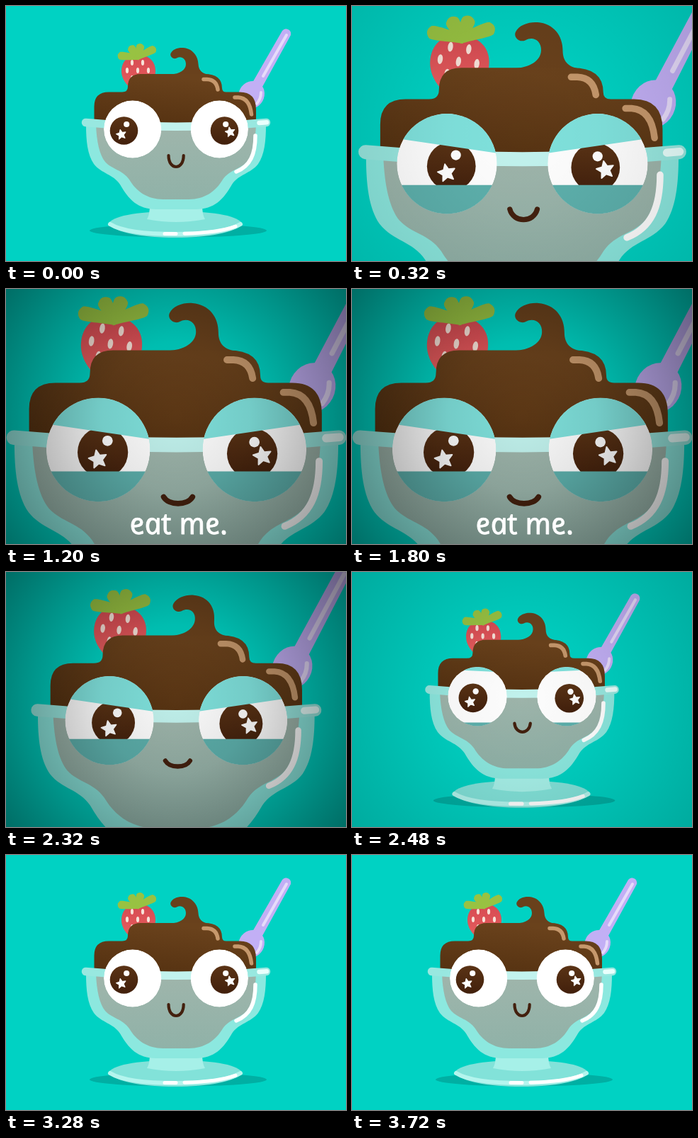
An HTML page that plays this animation: 480 px wide and 360 px high, repeating every 4320 ms.

```html
<!DOCTYPE html>
<html lang="en">
<head>
<meta charset="utf-8">
<title>Pudding cup</title>
<style>
html, body { margin: 0; width: 100%; height: 100%; overflow: hidden; background: #00d2c3; }
svg { display: block; width: 100vw; height: 100vh; }
text { font: italic 500 42px "Noto Sans", "Open Sans", sans-serif; fill: #fff; stroke: #fff; stroke-width: .8; stroke-linejoin: round; white-space: pre; }
.line { fill: none; stroke-linecap: round; stroke-linejoin: round; }
</style>
</head>
<body>
<svg viewBox="0 0 480 360" preserveAspectRatio="none">
  <defs>
    <linearGradient id="choc" x1="0" y1="1" x2=".35" y2="0">
      <stop offset="0" stop-color="#533010"/><stop offset="1" stop-color="#6a421c"/>
    </linearGradient>
    <linearGradient id="iris" x1="0" y1="0" x2="0" y2="1">
      <stop offset="0" stop-color="#5a3315"/><stop offset="1" stop-color="#42200c"/>
    </linearGradient>
    <linearGradient id="fill" x1="0" y1="0" x2="0" y2="1">
      <stop offset="0" stop-color="#9fb5ab"/><stop offset="1" stop-color="#90b2a8"/>
    </linearGradient>
    <linearGradient id="red" x1="0" y1="0" x2="0" y2="1">
      <stop offset="0" stop-color="#d64a52"/><stop offset="1" stop-color="#e8605f"/>
    </linearGradient>
    <linearGradient id="rim" gradientUnits="userSpaceOnUse" x1="107" y1="0" x2="373" y2="0">
      <stop offset=".1" stop-color="#98e8e0"/><stop offset=".4" stop-color="#c2f3ee"/>
      <stop offset=".6" stop-color="#c2f3ee"/><stop offset=".9" stop-color="#98e8e0"/>
    </linearGradient>
    <radialGradient id="dark" gradientUnits="userSpaceOnUse" cx="240" cy="180" r="300">
      <stop offset="0" stop-opacity=".02"/><stop offset=".35" stop-opacity=".1"/>
      <stop offset=".7" stop-opacity=".3"/><stop offset="1" stop-opacity=".48"/>
    </radialGradient>
    <clipPath id="ball"><circle r="40.7"/></clipPath>
  </defs>
  <rect width="480" height="360" fill="#00d2c3"/>
  <g id="cup">
    <ellipse cx="243" cy="317" rx="125" ry="9.5" fill="#00afa3"/>
    <path d="M144 308C150 297 180 290 240 290S328 297 334 308C322 320 286 327 239 327S156 320 144 308Z" fill="#82e2d9"/>
    <path class="line" d="M147 308Q170 322 239 322T331 308" stroke="#b4f5ee" stroke-width="6"/>
    <path class="line" d="M224 321.5H240M252 321.3Q300 320 324 311" stroke="#fff" stroke-width="5"/>
    <path d="M203 280H277Q277 295 281 301Q240 309 199 301Q203 295 203 280Z" fill="#a6f0e8"/>

    <g id="spoon">
      <g fill="#c2aff5">
        <path d="M390 35Q394 30 400 34Q404 38 401 43L362 114L348 108Z"/>
        <ellipse cx="346.5" cy="125.5" rx="18" ry="20" transform="rotate(29 346.5 125.5)"/>
      </g>
      <path class="line" d="M396 41L363 99M360 122Q360 131 354 138" stroke="#e6dbfa" stroke-width="4"/>
    </g>
    <g id="berry">
      <path d="M-24 -1C-24 -17 -12 -24 0 -24S24 -17 24 -1C24 14 10 26 0 28C-10 26 -24 14 -24 -1Z" fill="url(#red)"/>
      <g id="seeds" fill="#f7e2d8"></g>
      <g id="leaves" fill="#98c242"></g>
    </g>

    <path d="M113 168C113 190 115 210 124 223C135 237 151 237 161 252C173 273 186 287 212 287H268C294 287 307 273 319 252C329 237 345 237 356 223C365 210 367 190 367 168Z" fill="#8ce8df"/>
    <path d="M127 168C128 192 132 210 140 220C150 231 164 231 174 245C184 262 200 273 222 273H258C280 273 296 262 306 245C316 231 330 231 340 220C348 210 352 192 353 168Z" fill="url(#fill)"/>
    <path class="line" d="M352 183C352 209 345 226 325 234" stroke="#fff" stroke-width="5.5"/>

    <g id="pudding">
      <path id="curl" d="M232 98V96.500C246 96 254 90 254 82C254 74 247 70 241 73.500C236 76 231 71 232.500 67C235 61 243 58.500 250 59C263 60 271 70 271.500 82C272 91 277 96 288 97Z" fill="#69411c"/>
      <path d="M124.500 168V142Q124.500 121.500 145 121.500H164Q172 121.500 172 114Q172 96 190 96H280Q305 96 305 116Q305 121.500 311 121.500H330Q353 121.500 353 146V168Z" fill="url(#choc)"/>
      <path class="line" d="M279 103.500H284Q297 104 299 118M323 129H328Q344 130 346.500 153" stroke="#c6986c" stroke-width="5.500"/>
    </g>
    <path class="line" d="M112.500 164.500Q240 176 367.500 164.500" stroke="url(#rim)" stroke-width="11.500"/>
    <path class="line" d="M357.500 165L368 164.200" stroke="#e8fffc" stroke-width="6.500"/>
    <g id="eyes"></g>
    <path id="smile" class="line" stroke="#43200e" stroke-width="4.200"/>
    <path id="mouth" fill="#43200e"/>
  </g>
  <rect id="shade" width="480" height="360" fill="url(#dark)"/>
  <text id="word" transform="translate(177 346) skewX(12)"></text>
</svg>
<script>
const LOOP = 4320;
const $ = id => document.getElementById(id);
const set = (el, name, v) => el.setAttribute(name, v);

function add(parent, tag, attrs) {
  const el = document.createElementNS("http://www.w3.org/2000/svg", tag);
  for (const k in attrs) set(el, k, attrs[k]);
  parent.appendChild(el);
  return el;
}

const smooth = u => u * u * (3 - 2 * u);
const cubic = u => u < .5 ? 4 * u ** 3 : 1 - 4 * (1 - u) ** 3;
const ramp = (t, a, b, ease = smooth) => ease(Math.min(1, Math.max(0, (t - a) / (b - a))));
// Rises from a to b, falls from c to d
const hold = (t, a, b, c, d, ease) => ramp(t, a, b, ease) - ramp(t, c, d, ease);
// Damped swing that peaks near 1 after a quarter of its length
function swing(t, from, len) {
  const u = (t - from) / len;
  return u > 0 && u < 1 ? 1.8 * (1 - u) ** 2 * Math.sin(2 * Math.PI * u) : 0;
}

// Strawberry details
for (let row = 0; row < 3; row++) {
  const odd = row % 2;
  for (let k = 0; k < 2 + odd; k++)
    add($("seeds"), "ellipse", { cx: -9 - 7 * odd + 15 * k, cy: -13 + 11 * row, rx: 2.1, ry: 4 });
}
for (let i = 0; i < 4; i++) {
  const len = i % 3 ? 20 : 29;
  add($("leaves"), "path", {
    d: `M-4 2C-4 -8 -7 ${6 - len} -5 ${3 - len}Q0 ${-2 - len} 5 ${3 - len}C7 ${6 - len} 4 -8 4 2Z`,
    transform: `translate(-1 -21) rotate(${50 * i - 86})`
  });
}

// Eyes
function star(x, y) {
  let d = "";
  for (let i = 0; i < 10; i++) {
    const r = i % 2 ? 3.5 : 7.4, a = i * Math.PI / 5 - .2;
    d += (i ? "L" : "M") + (x + r * Math.sin(a)).toFixed(2) + " " + (y - r * Math.cos(a)).toFixed(2);
  }
  return d + "Z";
}

function makeEye(x, side, sx, sy) {
  const g = add($("eyes"), "g", { transform: `translate(${x} 174)`, "clip-path": "url(#ball)" });
  add(g, "circle", { r: 40.7, fill: "#fff" });
  const pupil = add(g, "g", {});
  add(pupil, "circle", { r: 19.8, fill: "url(#iris)" });
  add(pupil, "circle", { cx: 2.7 + side, cy: -9, r: 4.1, fill: "#fff" });
  add(pupil, "path", { d: star(sx, sy), fill: "#fff", stroke: "#fff", "stroke-linejoin": "round" });
  const lids = add(g, "g", { transform: `scale(${side} 1)` });
  return {
    pupil,
    low: add(lids, "path", { fill: "#5db0ac" }),
    top: add(lids, "path", { fill: "#80e2dd" })
  };
}
const left = makeEye(178.7, 1, -3.8, 5.5);
const right = makeEye(301.3, -1, 8, 2);

function draw(t) {
  const z = hold(t, 0, 440, 2130, 2570, cubic);
  set($("cup"), "transform", `translate(${240 + .5 * z} ${173.5 + 52.5 * z}) scale(${1 + .8 * z}) translate(-240 -173.5)`);

  // Loose parts trail behind the camera
  const kick = swing(t, 2565, 300);
  set($("spoon"), "transform", `rotate(${4.5 * kick - 2 * z} 346 126)`);
  set($("berry"), "transform", `translate(${187 + 2 * z - 2 * kick} 93) rotate(${8 * z - 4 * kick})`);

  const lean = 2 * z + 6.5 * swing(t, 520, 480) + 3 * swing(t, 2200, 760);
  set($("pudding"), "transform", `translate(124 0) scale(${1 + .0024 * lean} 1) translate(-124 0)`);
  set($("curl"), "transform", `translate(0 96) skewX(${-1.55 * lean}) translate(0 -96)`);

  // Eyes
  const look = hold(t, 40, 300, 2320, 2600);
  const bob = swing(t, 2540, 420);
  set(left.pupil, "transform", `translate(${-12.2 + 15.8 * look + bob} ${2 - 3 * bob})`);
  set(right.pupil, "transform", `translate(${7.2 - 9 * look + 3 * bob} ${2 + look + 2.5 * bob})`);

  const squint = hold(t, 40, 340, 2320, 2580);
  const blink = hold(t, 3280, 3440, 3500, 3700);
  const top = 54 * blink - 45, low = 45 - 28 * squint - 36 * blink;
  for (const eye of [left, right]) {
    set(eye.top, "d", `M-46 -46H46V${top + 37.5 * squint}L-46 ${top + 24 * squint}Z`);
    set(eye.low, "d", `M-46 46H46V${low}H-46Z`);
  }

  // Mouth: smile, or open while speaking
  const calm = hold(t, 40, 480, 2320, 2600);
  const drop = (16 - 10.8 * calm) * 4 / 3;
  const x1 = 229.5 + .5 * calm, x2 = 250.7 + 2 * calm;
  set($("smile"), "d", `M${x1} 211C${x1 + calm * 4} ${211 + drop} ${x2 - calm * 4} ${211 + drop} ${x2} 211`);
  const h = 22 * (hold(t, 520, 600, 660, 740) + hold(t, 760, 840, 880, 980));
  const open = h > 4, r = Math.min(12, h * .55), y = 209 + h - r;
  set($("smile"), "visibility", open ? "hidden" : "visible");
  set($("mouth"), "d", open ? `M228 211Q228 209 230 209H253Q255 209 255 211V${y}A13.5 ${r} 0 0 1 228 ${y}Z` : "");

  set($("shade"), "opacity", hold(t, 200, 560, 2320, 2600));
  $("word").textContent = "eat me.".slice(0, Math.max(0, Math.floor((t - 460) / 60)));
  set($("word"), "opacity", 1 - ramp(t, 2040, 2160));
}

const start = performance.now();
function tick() {
  draw((performance.now() - start) % LOOP);
  requestAnimationFrame(tick);
}
tick();
</script>
</body>
</html>
```
